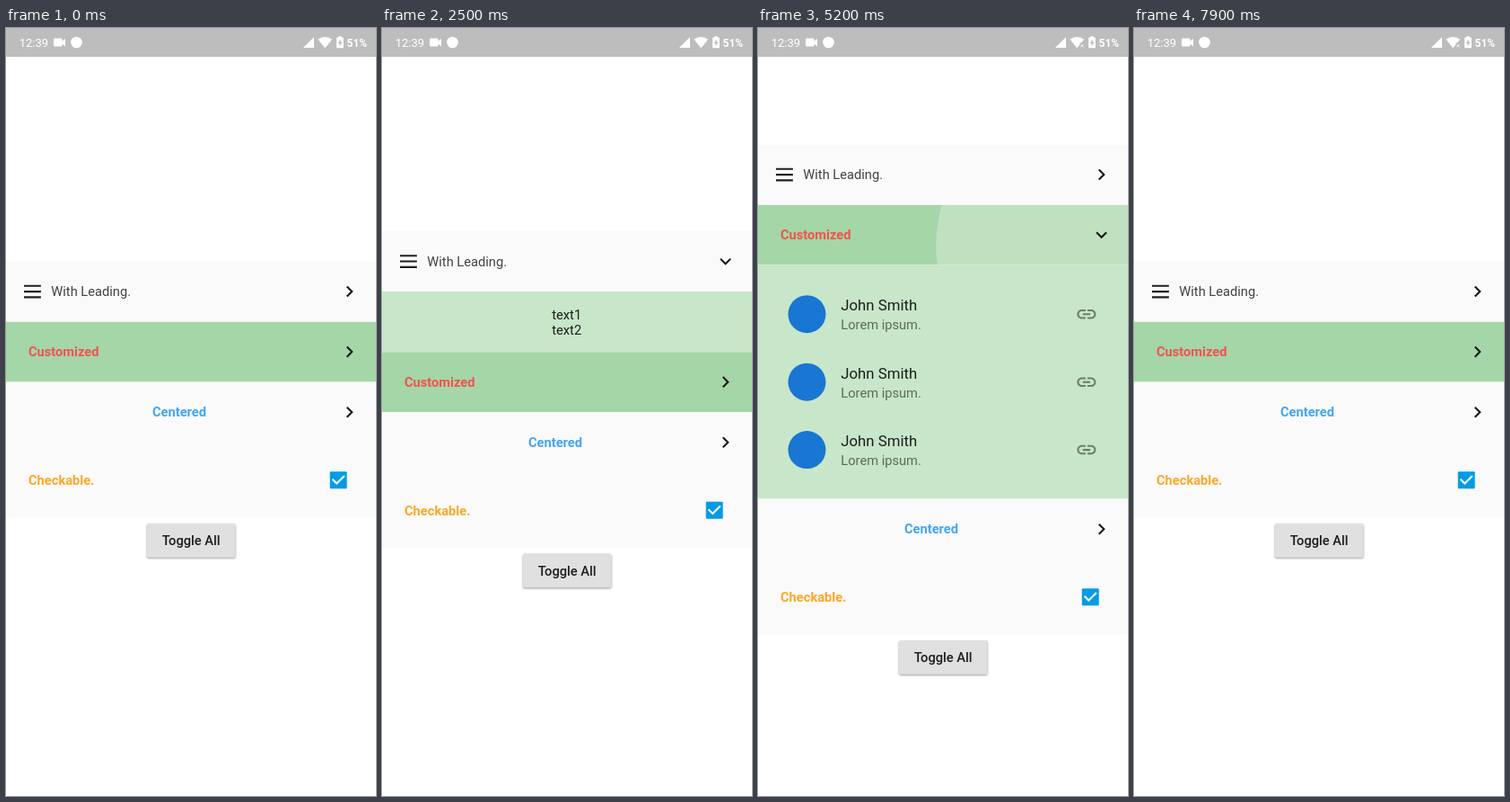
These frames come from a looping animation (412x854 px, 8000 ms). An HTML page:

```html
<!DOCTYPE html>
<html lang="en">
<head>
<meta charset="utf-8">
<title>Expandable list</title>
<style>
  html, body { margin: 0; width: 100%; height: 100%; overflow: hidden; background: #fff; }
  #stage { display: block; width: 412px; height: 854px; }
  text { font: 400 14.67px Roboto, sans-serif; fill: #1d1d1d; }
  .bold { font-weight: 700; }
  .mid { text-anchor: middle; }
  .title { font-size: 16.77px; }
  .sub { fill: rgba(0, 0, 0, .54); }
  .status text { fill: #fff; font-size: 13px; }
  .button rect { fill: #e0e0e0; filter: drop-shadow(0 1.5px 1.2px rgba(0, 0, 0, .4)); }
</style>
</head>
<body>
<svg id="stage" viewBox="0 0 412 854">
  <defs>
    <path id="arrow" d="M-2 -6L-3.41 -4.59 1.17 0l-4.58 4.59L-2 6l6-6z" fill="#181818"/>
    <path id="link" transform="scale(1.048) translate(-12 -12)" fill="#000" fill-opacity=".46"
      d="M3.9 12c0-1.71 1.39-3.1 3.1-3.1h4V7H7c-2.76 0-5 2.24-5 5s2.24 5 5 5h4v-1.9H7c-1.71 0-3.1-1.39-3.1-3.1zM8 13h8v-2H8v2zm9-6h-4v1.9h4c1.71 0 3.1 1.39 3.1 3.1s-1.39 3.1-3.1 3.1h-4V17h4c2.76 0 5-2.24 5-5s-2.24-5-5-5z"/>
    <g id="person">
      <circle cx="54.5" cy="37.7" r="21" fill="#1976d2"/>
      <text class="title" x="92.3" y="33.6">John Smith</text>
      <text class="sub" x="92.3" y="54.6">Lorem ipsum.</text>
      <use href="#link" x="0" y="0" transform="translate(365.8 37.7)"/>
    </g>
  </defs>

  <g class="status">
    <rect width="412" height="32" fill="#bdbdbd"/>
    <text x="14.7" y="20.8">12:39</text>
    <g fill="#fff">
      <path d="M54 11.5h7.6q1 0 1 1v2.3l3.4-3v8.6l-3.4-3v2.200q0 1-1 1H54q-1 0-1-1v-7.100q0-1 1-1z"/>
      <circle cx="78.5" cy="16" r="6.3"/>
      <path d="M331 22L343 10V22z"/>
      <path d="M355.300 22.300L347.500 12.700Q355.300 7 363.100 12.700z"/>
      <path d="M370.200 10.500V9.200h3.400v1.300h2.200V22.300H368V10.500z"/>
    </g>
    <path d="M372.800 12.200L369.700 17h1.800v3.600l3-4.900h-1.700z" fill="#bdbdbd"/>
    <g id="offline">
      <path d="M358.200 16.500H364V23H358.200z" fill="#bdbdbd"/>
      <path d="M359.600 18.300l2.600 3M362.200 18.300l-2.600 3" stroke="#fff" stroke-width=".9"/>
    </g>
    <text class="bold" x="379.500" y="20.600" style="font-size:12px">51%</text>
  </g>

  <g id="list">
    <svg class="row" width="412" height="67.100">
      <rect width="412" height="67.100" fill="#fafafa"/>
      <rect class="tint" width="412" height="67.100"/>
      <circle class="ripple" fill="#000"/>
      <path d="M20 27.300h18.900M20 33.600h18.900M20 39.900h18.900" stroke="#202020" stroke-width="2.1"/>
      <text x="50.300" y="38.800" style="fill:#424242">With Leading.</text>
      <g class="arrow"><use href="#arrow"/></g>
    </svg>
    <svg class="body" width="412"><g>
      <rect width="412" height="67.100" fill="#c8e6c9"/>
      <text class="mid" x="205.700" y="30.800">text1</text>
      <text class="mid" x="205.700" y="47.500">text2</text>
    </g></svg>

    <svg class="row" width="412" height="67.100">
      <rect width="412" height="67.100" fill="#a5d6a7"/>
      <rect class="tint" width="412" height="67.100"/>
      <circle class="ripple" fill="#eaf0ea"/>
      <text class="bold" x="25" y="38.800" style="fill:#ef5350">Customized</text>
      <g class="arrow"><use href="#arrow"/></g>
    </svg>
    <svg class="body" width="412"><g>
      <rect width="412" height="260" fill="#c8e6c9"/>
      <use href="#person" y="16.800"/>
      <use href="#person" y="92.300"/>
      <use href="#person" y="167.700"/>
    </g></svg>

    <g id="rest">
      <rect width="412" height="151" fill="#fafafa"/>
      <text class="bold mid" x="193" y="38.800" style="fill:#42a5f5">Centered</text>
      <g class="arrow"><use href="#arrow"/></g>
      <text class="bold" x="25" y="114.300" style="fill:#ffa726">Checkable.</text>
      <rect x="360.700" y="99.600" width="18.900" height="18.900" rx="1" fill="#039be5"/>
      <path d="M363.500 108.100l4.700 4.700l8.500-8.500" fill="none" stroke="#fff" stroke-width="2.1"/>
      <g class="button">
        <rect x="157" y="157.300" width="98.500" height="37.700" rx="2"/>
        <text class="mid" x="206.100" y="181.300" style="font-weight:500">Toggle All</text>
      </g>
    </g>
  </g>
</svg>

<script>
const LOOP = 8000, ROW = 67.1, TOP = 259.5;
const RESIZE = 200, DELAY = 10, SPEED = 0.75;
const OFFLINE_AT = 5000;

// Each panel: open height, ink strengths, and taps as [time, x, y].
const panels = [
  { full: 67.1, tint: 0.02, ink: 0.045, taps: [[2090, 318, 23], [3680, 318, 23]] },
  { full: 260, tint: 0, ink: 0.75, taps: [[4990, 356.5, 45], [7510, 356.5, 45]] }
];

const all = s => [...document.querySelectorAll(s)];
const byId = id => document.getElementById(id);
const set = (el, attrs) => { for (const k in attrs) el.setAttribute(k, attrs[k]); };
const clamp = v => Math.max(0, Math.min(1, v));
const move = (el, y) => set(el, { transform: `translate(0 ${y})` });

const rows = all('.row'), bodies = all('.body');
const tints = all('.tint'), ripples = all('.ripple'), arrows = all('.arrow');

function turn(arrow, open) {
  set(arrow, { transform: `translate(382.5 33.5) rotate(${open ? 90 : 0}) scale(1.048)` });
}

function drawInk(i, t) {
  const p = panels[i];
  const tap = p.taps.find(([at]) => t >= at && t < at + 320);
  if (!tap) {
    set(tints[i], { opacity: 0 });
    set(ripples[i], { opacity: 0 });
    return;
  }
  const [at, x, y] = tap, age = t - at;
  const fade = 1 - clamp((age - 110) / 200);
  set(tints[i], { opacity: p.tint * fade });
  set(ripples[i], { cx: x, cy: y, r: age * SPEED, opacity: p.ink * fade });
}

function render(t) {
  const heights = panels.map(({ full, taps: [[a], [b]] }) =>
    full * (clamp((t - a - DELAY) / RESIZE) - clamp((t - b - DELAY) / RESIZE)));
  let y = 0;
  panels.forEach((p, i) => {
    const open = t >= p.taps[0][0] && t < p.taps[1][0];
    const h = heights[i];
    set(rows[i], { y });
    y += ROW;
    // Content leaves at once on closing, only the gap shrinks.
    set(bodies[i], { y, height: h, visibility: open ? 'visible' : 'hidden' });
    move(bodies[i].firstElementChild, (h - p.full) / 2);
    y += h;
    turn(arrows[i], open);
    drawInk(i, t);
  });
  move(byId('rest'), y);
  move(byId('list'), TOP - (heights[0] + heights[1]) / 2);
  set(byId('offline'), { opacity: t >= OFFLINE_AT ? 1 : 0 });
}

turn(arrows[2], false);
const start = performance.now();
function tick() {
  render((performance.now() - start) % LOOP);
  requestAnimationFrame(tick);
}
tick();
</script>
</body>
</html>
```
